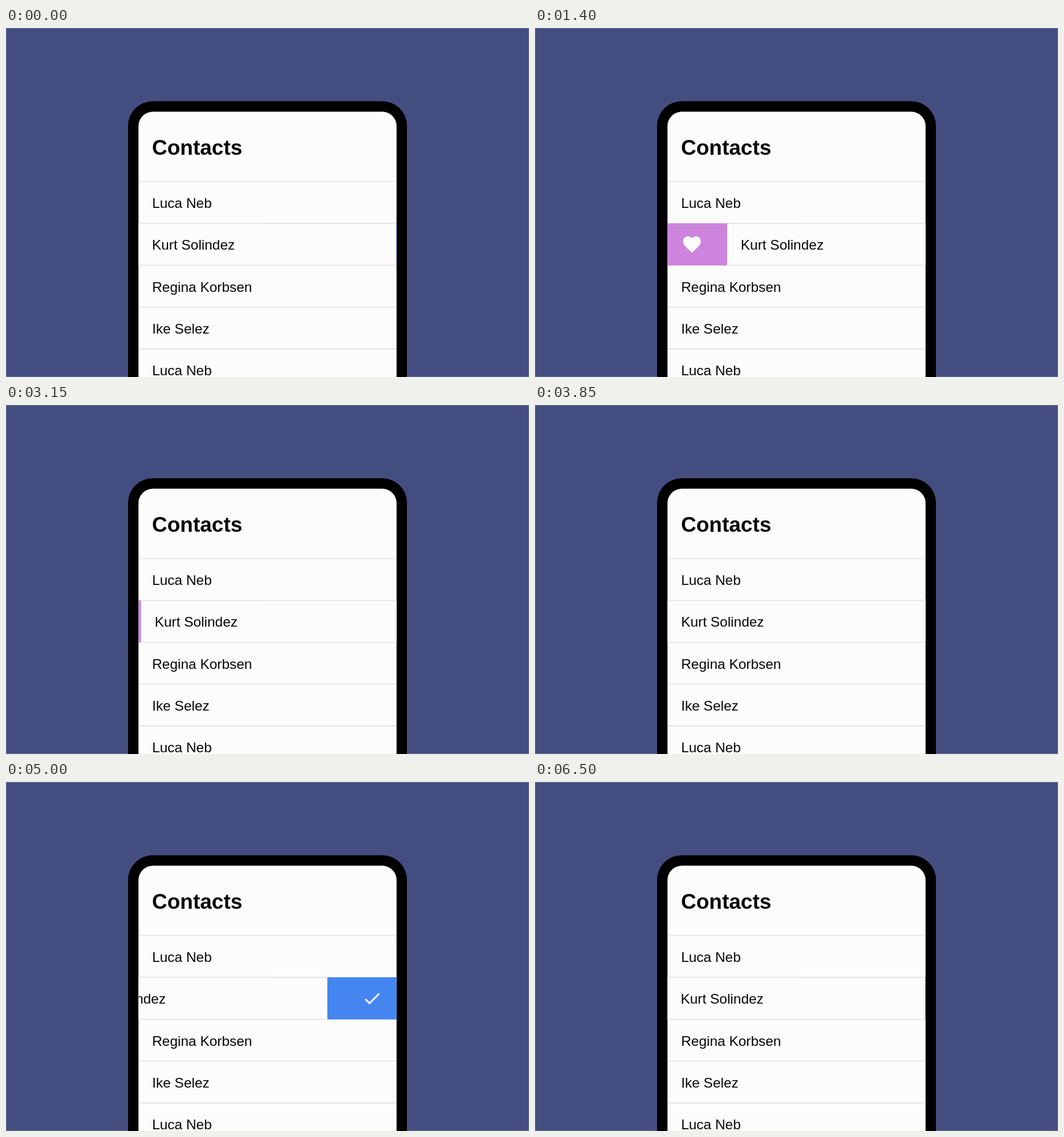
Write an HTML page that moves like this. It is 917 px wide and 611 px high and loops after 6.55 s.

```html
<!DOCTYPE html>
<html lang="en">
<head>
<meta charset="utf-8">
<title>Swipe actions</title>
<style>
  html, body { margin: 0; width: 100%; height: 100%; overflow: hidden; background: #444d80; }
  svg { display: block; width: 100%; height: 100%; }
  text { font: 24.45px "Liberation Sans", Arial, sans-serif; fill: #060606; }
  .title { font-size: 37px; font-weight: bold; }
  .rule { stroke: #dedee0; stroke-width: 1.3; }
  .icon { fill: #fcfcfc; }
</style>
</head>
<body>
<svg viewBox="0 0 917 611">
  <defs>
    <clipPath id="screen"><rect x="232.3" y="146.6" width="452.5" height="600" rx="25"/></clipPath>
  </defs>
  <rect width="917" height="611" fill="#444d80"/>
  <rect x=".5" y=".5" width="916" height="610" fill="none" stroke="#7780a8" stroke-opacity=".7"/>
  <rect x="214" y="128.2" width="489" height="640" rx="43"/>
  <g clip-path="url(#screen)">
    <rect x="232" y="146" width="454" height="465" fill="#fcfcfc"/>
    <text class="title" x="256" y="222">Contacts</text>
    <g id="list"></g>
    <g id="like">
      <rect x="232" y="341.8" width="227" height="73.8" fill="#cd84dd"/>
      <path class="icon" transform="translate(256.6 360.2) scale(1.55)" d="M12 21.35l-1.45-1.32C5.4 15.36 2 12.28 2 8.5 2 5.42 4.42 3 7.5 3c1.74 0 3.41.81 4.5 2.09C13.09 3.81 14.76 3 16.5 3 19.58 3 22 5.42 22 8.5c0 3.78-3.4 6.86-8.55 11.54z"/>
    </g>
    <g id="done">
      <rect x="459" y="341.8" width="227" height="73.8" fill="#4485f0"/>
      <path class="icon" transform="translate(623.9 361.1) scale(1.5)" d="M9 16.17L4.83 12l-1.42 1.41L9 19 21 7l-1.41-1.41z"/>
    </g>
    <g id="row">
      <rect x="232.3" y="341.8" width="452.5" height="73.8" fill="#fcfcfc"/>
    </g>
  </g>
</svg>
<script>
const LOOP = 6550, WIDTH = 122.3, TOP = 268.6, PITCH = 73.35;
const NAMES = ["Luca Neb", "Kurt Solindez", "Regina Korbsen", "Ike Selez", "Luca Neb"];
const MOVES = [
  { at: 1125, ms: 780, from: 0, to: WIDTH },
  { at: 2688, ms: 800, from: WIDTH, to: 0 },
  { at: 4390, ms: 780, from: 0, to: -WIDTH },
  { at: 5974, ms: 660, from: -WIDTH, to: 0 }
];
const $ = id => document.getElementById(id);

function add(parent, tag, attrs, label = "") {
  const el = document.createElementNS("http://www.w3.org/2000/svg", tag);
  for (const key in attrs) el.setAttribute(key, attrs[key]);
  el.textContent = label;
  parent.append(el);
}

function rule(parent, y) {
  add(parent, "line", { class: "rule", x1: 232.3, x2: 684.8, y1: y, y2: y });
}

NAMES.forEach((name, i) => {
  const y = TOP + i * PITCH, parent = i === 1 ? $("row") : $("list");
  rule(parent, y);
  if (i === 1) rule(parent, y + PITCH);
  add(parent, "text", { x: 256.2, y: y + 46.4 }, name);
});

// cubic-bezier(.36, .66, .04, 1), solved by bisection
function ease(p) {
  if (p <= 0) return 0;
  if (p >= 1) return 1;
  const curve = (s, a, b) => 3 * (1 - s) ** 2 * s * a + 3 * (1 - s) * s * s * b + s ** 3;
  let lo = 0, hi = 1;
  for (let i = 0; i < 24; i++) {
    const mid = (lo + hi) / 2;
    if (curve(mid, .36, .04) < p) lo = mid; else hi = mid;
  }
  return curve(lo, .66, 1);
}

function offset(t) {
  if (t < 100) t += LOOP; // the last move settles across the loop point
  const move = MOVES.filter(m => t >= m.at).pop();
  return move ? move.from + (move.to - move.from) * ease((t - move.at) / move.ms) : 0;
}

function draw(t) {
  const x = offset(t);
  $("row").setAttribute("transform", `translate(${x.toFixed(2)} 0)`);
  $("like").setAttribute("visibility", x > .05 ? "visible" : "hidden");
  $("done").setAttribute("visibility", x < -.05 ? "visible" : "hidden");
}

const start = performance.now();
function tick() {
  draw((performance.now() - start) % LOOP);
  requestAnimationFrame(tick);
}
tick();
</script>
</body>
</html>
```
